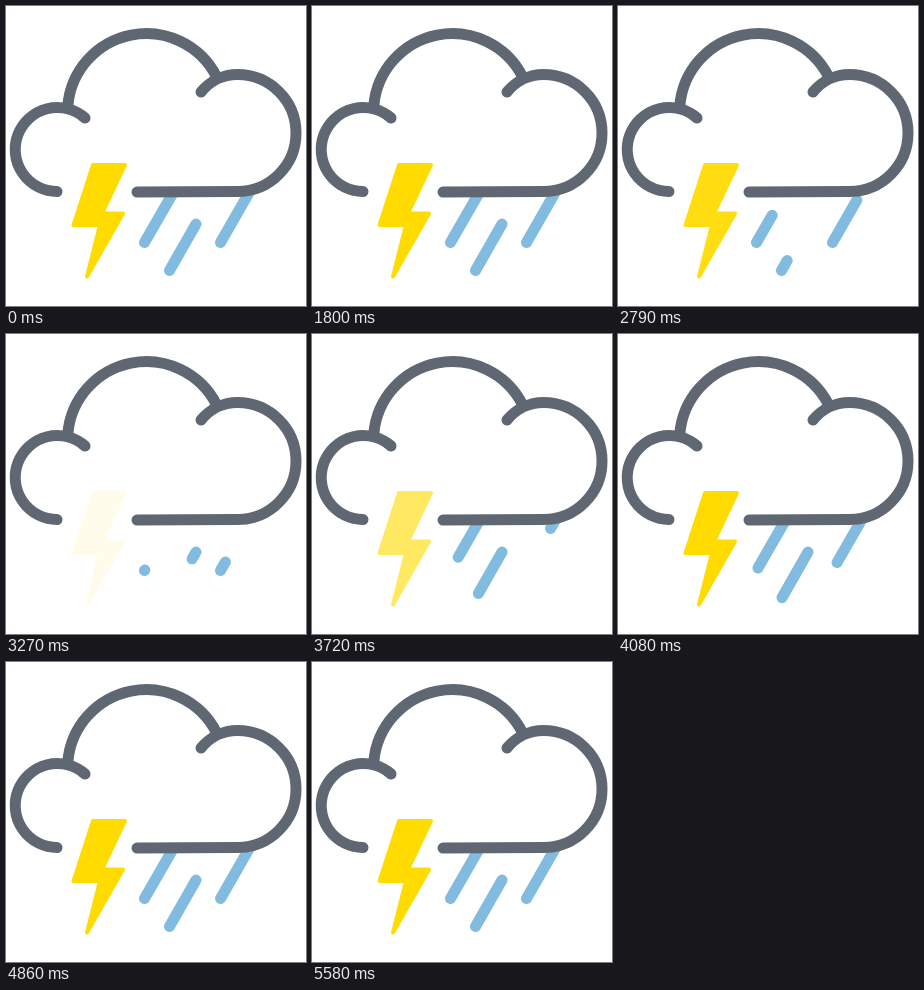
An HTML page without scripts that plays this animation: 300 px wide and 300 px high, repeating every 6330 ms.

```html
<!DOCTYPE html>
<html lang="en">
<head>
<meta charset="utf-8">
<title>Thunderstorm</title>
<style>
  html, body { margin: 0; width: 100%; height: 100%; overflow: hidden; background: #fff; }
  svg { display: block; width: 100%; height: 100%; }

  .cloud, .rain { fill: none; stroke-width: 11; stroke-linecap: round; }
  .cloud { stroke: #5f6872; }
  .rain { stroke: #82bbe0; }

  .rain path {
    stroke-dasharray: 1 2;
    animation: fall 6.33s var(--delay) infinite;
  }

  .bolt {
    fill: #ffdb00;
    stroke: #ffdb00;
    stroke-width: 4;
    stroke-linejoin: round;
    animation: fade 6.33s infinite;
  }

  /* Each drop drains downwards, then is drawn again from the top. */
  @keyframes fall {
    0% { stroke-dashoffset: 0; }
    28.44% { stroke-dashoffset: 0; animation-timing-function: cubic-bezier(.7, 0, .5, 1); }
    51.03% { stroke-dashoffset: -1.01; }
    51.04% { stroke-dashoffset: 1.01; animation-timing-function: cubic-bezier(.16, 1, .3, 1); }
    75.2%, 100% { stroke-dashoffset: 0; }
  }

  @keyframes fade {
    0% { opacity: 1; }
    40.4% { opacity: 1; animation-timing-function: cubic-bezier(.65, 0, .35, 1); }
    55.6% { opacity: 0; animation-timing-function: cubic-bezier(.25, .46, .45, .94); }
    64.5%, 100% { opacity: 1; }
  }
</style>
</head>
<body>
<svg viewBox="0 0 300 300">
  <g class="rain">
    <path pathLength="1" style="--delay: .2s" d="M167 187L138.5 236.5"/>
    <path pathLength="1" style="--delay: 0s" d="M190 218L163.5 264.5"/>
    <path pathLength="1" style="--delay: .444s" d="M243.5 186L214.5 236.5"/>
  </g>
  <g class="cloud">
    <path d="M51 185.5A42 42 0 1 1 79 112"/>
    <path d="M61.8 100A78.8 78.8 0 0 1 210.5 70.5"/>
    <path d="M195 86A46.8 46.8 0 0 1 231.5 68.5A58.5 58.5 0 0 1 231.5 185.5L131 186"/>
  </g>
  <path class="bolt" d="M87 159H119L96 207.5H117L81 270.5L94 219H67.5Z"/>
</svg>
</body>
</html>
```
